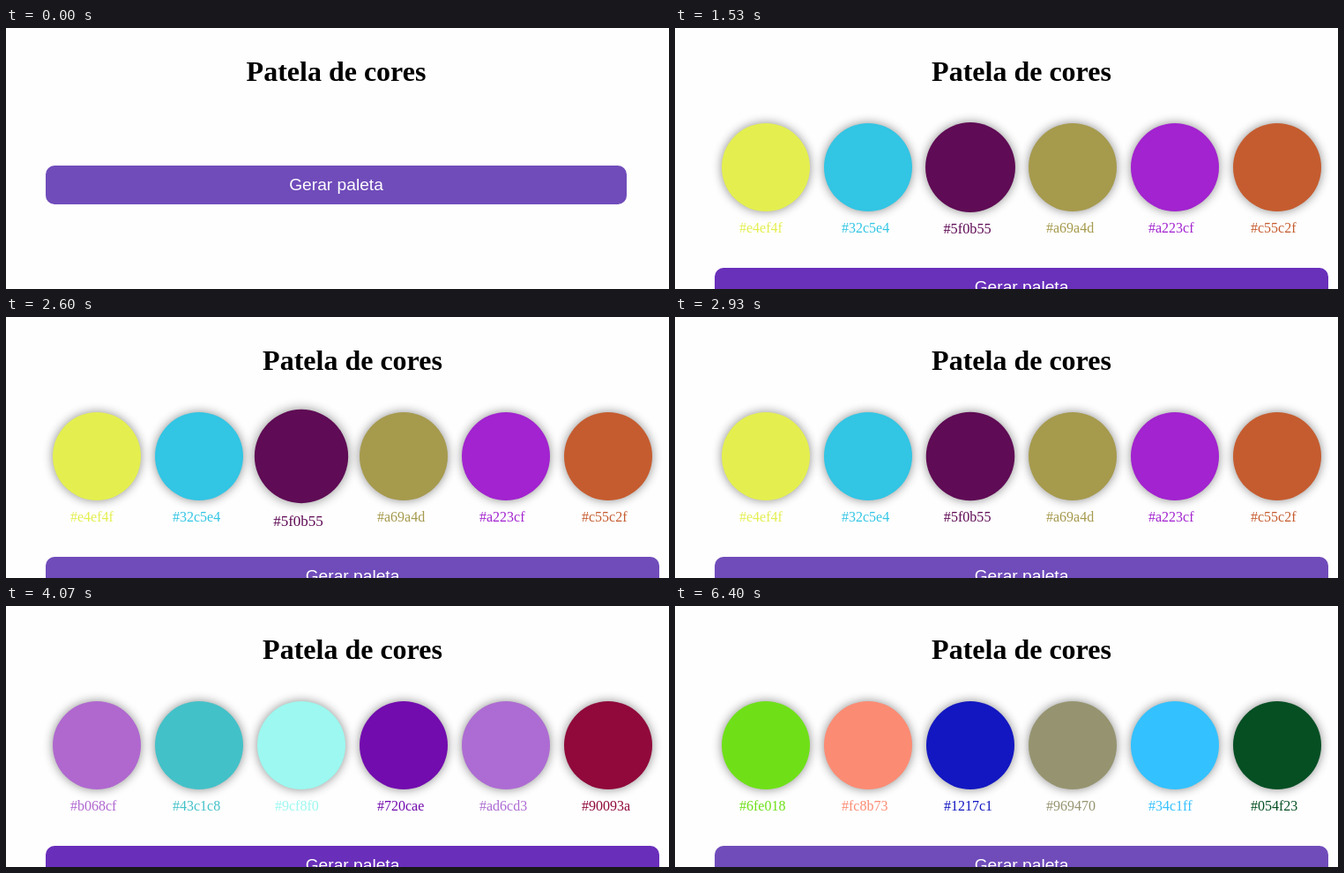
These frames come from a looping animation (752x296 px, 8.03 s). An HTML page:

```html
<!DOCTYPE html>
<html lang="pt">
<head>
<meta charset="utf-8">
<title>Patela de cores</title>
<style>
  html, body { margin: 0; width: 100%; height: 100%; overflow: hidden; background: #fefefe; }
  svg { display: block; width: 752px; height: 296px; }
  .title { font: bold 32px "Liberation Serif", serif; }
  .code { font: 16px "Liberation Serif", serif; }
  .caption { font: 19.2px "Liberation Sans", sans-serif; fill: #fff; }
  .title, .caption { text-anchor: middle; }
</style>
</head>
<body>
<svg viewBox="0 0 752 296">
  <defs>
    <filter id="blur" x="-30%" y="-30%" width="160%" height="160%" color-interpolation-filters="sRGB">
      <feGaussianBlur stdDeviation="6"/>
    </filter>
  </defs>
  <text id="title" class="title" y="60">Patela de cores</text>
  <g id="swatches"></g>
  <g id="button">
    <rect id="face" x="45" y="156" height="44" rx="10"/>
    <text id="caption" class="caption" y="184">Gerar paleta</text>
  </g>
</svg>
<script>
const LOOP = 8030;
const FADE = 300;
const IDLE = [112, 76, 186];
const HOVER = [105, 46, 186];

const palettes = [
  { from: 1530, colors: ["#e4ef4f", "#32c5e4", "#5f0b55", "#a69a4d", "#a223cf", "#c55c2f"] },
  { from: 3630, colors: ["#b068cf", "#43c1c8", "#9cf8f0", "#720cae", "#ad6cd3", "#90093a"] },
  { from: 5830, colors: ["#6fe018", "#fc8b73", "#1217c1", "#969470", "#34c1ff", "#054f23"] }
];

const byId = id => document.getElementById(id);
const [title, group, button, face, caption] =
  ["title", "swatches", "button", "face", "caption"].map(byId);

function add(parent, tag, attrs) {
  const node = document.createElementNS("http://www.w3.org/2000/svg", tag);
  for (const name in attrs) node.setAttribute(name, attrs[name]);
  return parent.appendChild(node);
}

const swatches = Array.from({ length: 6 }, (_, i) => {
  const x = 103 + 116 * i;
  const root = add(group, "g", { transform: `translate(${x} 158)` });
  add(root, "circle", { r: 50, opacity: 0.45, filter: "url(#blur)" });
  const disc = add(root, "circle", { r: 50 });
  const label = add(root, "text", { class: "code", x: -30, y: 74 });
  return { x, root, disc, label };
});

const progress = (t, start, length = FADE) => Math.min(1, Math.max(0, (t - start) / length));

// The standard CSS "ease" curve.
function ease(p) {
  if (p <= 0 || p >= 1) return p;
  let low = 0, high = 1, s = 0.5;
  for (let i = 0; i < 20; i++) {
    s = (low + high) / 2;
    const x = 0.75 * s * (1 - s) + s ** 3;
    if (x < p) low = s; else high = s;
  }
  return 0.3 * s * (1 - s) ** 2 + 3 * s * s * (1 - s) + s ** 3;
}

const easeFrom = (t, start) => ease(progress(t, start));

function draw(t) {
  const palette = palettes.filter(p => t >= p.from).pop();
  const width = palette ? 696 : 659;
  const center = 45 + width / 2;

  title.setAttribute("x", center);
  caption.setAttribute("x", center);
  face.setAttribute("width", width);
  button.setAttribute("transform", `translate(0 ${palette ? 116 : 0})`);

  const hover = easeFrom(t, 850) - easeFrom(t, 1510) + easeFrom(t, 2965) - easeFrom(t, 6110);
  const rgb = IDLE.map((c, i) => Math.round(c + (HOVER[i] - c) * hover));
  face.setAttribute("fill", `rgb(${rgb})`);

  group.setAttribute("visibility", palette ? "visible" : "hidden");
  if (!palette) return;
  swatches.forEach(({ disc, label }, i) => {
    const color = palette.colors[i];
    disc.setAttribute("fill", color);
    label.setAttribute("fill", color);
    if (label.textContent !== color) label.textContent = color;
  });

  const scale = 1 + 0.1 * (easeFrom(t, 1485) - progress(t, 2390, 570));
  const { root, x } = swatches[2];
  root.setAttribute("transform", `translate(${x} 158) scale(${scale})`);
}

const start = performance.now();
function tick() {
  draw((performance.now() - start) % LOOP);
  requestAnimationFrame(tick);
}
tick();
</script>
</body>
</html>
```
